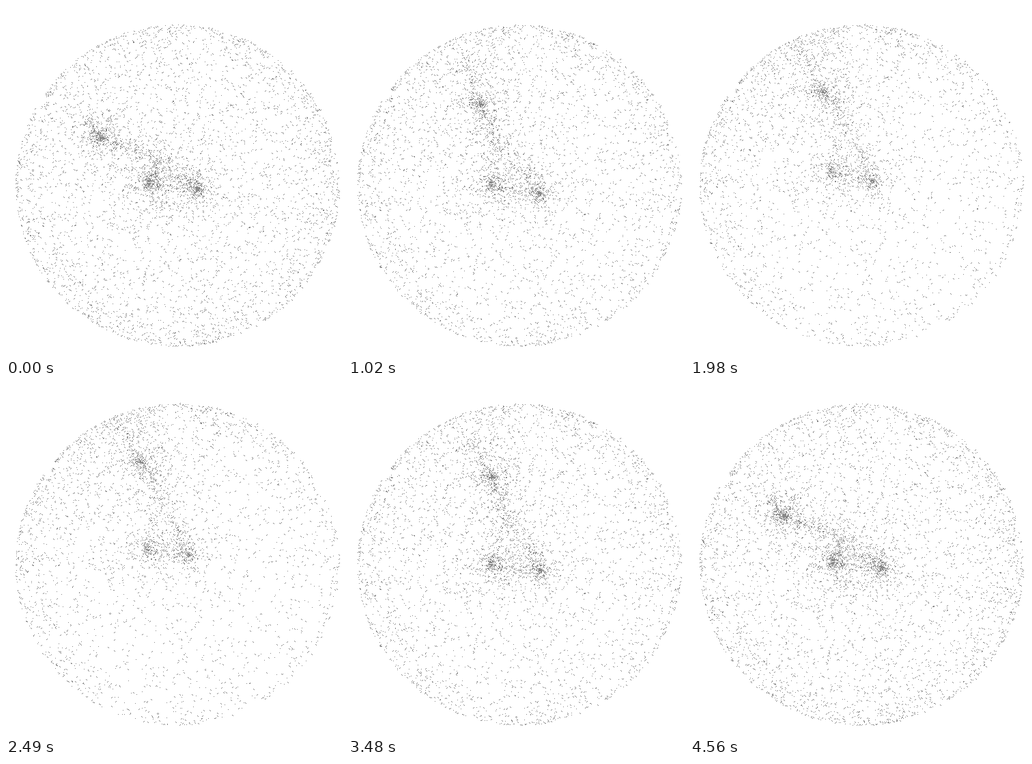
Write an HTML page with a canvas that moves like this. It is 492 by 512 pixels and loops after 4.59 s.

```html
<!DOCTYPE html>
<html>
<head>
<meta charset="utf-8">
<style>
html, body { margin: 0; width: 100%; height: 100%; overflow: hidden; background: #fff; }
canvas { display: block; }
</style>
</head>
<body>
<canvas id="stage" width="492" height="512"></canvas>
<script>
const ctx = document.getElementById('stage').getContext('2d');
const LOOP = 4590, STEP = 30;
const CX = 250.5, CY = 261.5, RX = 237, RY = 234.5;

// time, then x,y of: tail, knot, shoulder, left core, right core; then drift
const KEYS = [
  [0,    120, 165, 138, 192, 220, 222, 209, 259, 280, 267, 0],
  [1020, 171, 75,  193, 143, 214, 190, 209, 261, 280, 274, .11],
  [1980, 157, 50,  193, 125, 220, 150, 207, 242, 267, 255, .27],
  [2940, 169, 45,  200, 106, 222, 145, 207, 243, 270, 246, .24],
  [3480, 179, 78,  210, 134, 230, 185, 209, 262, 281, 271, .11],
  [4080, 103, 100, 130, 129, 198, 195, 205, 259, 276, 271, .03]
];

// anchor pair, number of dots, spread in pixels
const CLUSTERS = [
  [3, 3, 260, 20], [4, 4, 270, 19], [1, 1, 110, 7], [1, 1, 170, 30],
  [0, 1, 150, 17], [1, 2, 190, 22], [2, 3, 190, 26], [2, 4, 170, 25], [3, 4, 190, 30]
];

let seed = 7351;
function rnd() {
  seed = seed + 0x6D2B79F5 | 0;
  let x = Math.imul(seed ^ seed >>> 15, 1 | seed);
  x = x + Math.imul(x ^ x >>> 7, 61 | x) ^ x;
  return ((x ^ x >>> 14) >>> 0) / 4294967296;
}

const shape = () => ({ rank: rnd(), tick: Math.floor(rnd() * 4) });

const shell = Array.from({ length: 3900 }, () => {
  const r = Math.sqrt(1 - rnd() ** 1.55), a = rnd() * 2 * Math.PI;
  return { x: r * Math.cos(a), y: r * Math.sin(a), ...shape() };
});

const swarm = CLUSTERS.flatMap(([from, to, count, spread]) =>
  Array.from({ length: count }, () => {
    const r = -spread * Math.log(1 - rnd() * .99), a = rnd() * 2 * Math.PI;
    return { from, to, mix: rnd(), dx: r * Math.cos(a), dy: r * Math.sin(a), ...shape() };
  }));

function keyAt(i) {
  const n = KEYS.length, turn = Math.floor(i / n);
  const key = KEYS[i - turn * n].slice();
  key[0] += turn * LOOP;
  return key;
}

// Smooth cyclic curve through the keys
function poseAt(t) {
  let i = KEYS.length - 1;
  while (KEYS[i][0] > t) i--;
  const [p, a, b, q] = [i - 1, i, i + 1, i + 2].map(keyAt);
  const span = b[0] - a[0], u = (t - a[0]) / span;
  const u2 = u * u, u3 = u2 * u;
  return a.slice(1).map((va, k) => {
    const vb = b[k + 1];
    const ma = (vb - p[k + 1]) / (b[0] - p[0]) * span;
    const mb = (q[k + 1] - va) / (q[0] - a[0]) * span;
    return va * (2 * u3 - 3 * u2 + 1) + ma * (u3 - 2 * u2 + u)
      + vb * (3 * u2 - 2 * u3) + mb * (u3 - u2);
  });
}

function dot(x, y, tick) {
  x = Math.round(x);
  y = Math.round(y);
  ctx.fillRect(x, y, 1, 1);
  if (tick < 2) ctx.fillRect(x + 1, y + (tick ? 1 : -1), 1, 1);
}

function draw(t) {
  const pose = poseAt(t);
  const drift = Math.max(0, pose[10]), keep = 1 - 1.05 * drift;
  const ux = -.55, uy = -.835;
  const squeeze = Math.sqrt(1 - drift * drift);
  ctx.fillStyle = '#fff';
  ctx.fillRect(0, 0, 492, 512);
  ctx.fillStyle = '#888';

  for (const p of shell) {
    if (p.rank > keep) continue;
    const along = p.x * ux + p.y * uy, across = p.y * ux - p.x * uy;
    const scale = 1 + drift * along;
    const l = (along + drift) / scale, c = across * squeeze / scale;
    dot(CX + RX * (l * ux - c * uy), CY + RY * (l * uy + c * ux), p.tick);
  }

  for (const p of swarm) {
    if (p.rank > keep) continue;
    const mid = k => pose[p.from * 2 + k] * (1 - p.mix) + pose[p.to * 2 + k] * p.mix;
    const x = mid(0) + p.dx, y = mid(1) + p.dy;
    if (Math.hypot((x - CX) / RX, (y - CY) / RY) < 1) dot(x, y, p.tick);
  }
}

const start = performance.now();
function tick() {
  const t = (performance.now() - start) % LOOP;
  draw(Math.floor(t / STEP) * STEP);
  requestAnimationFrame(tick);
}
tick();
</script>
</body>
</html>
```
